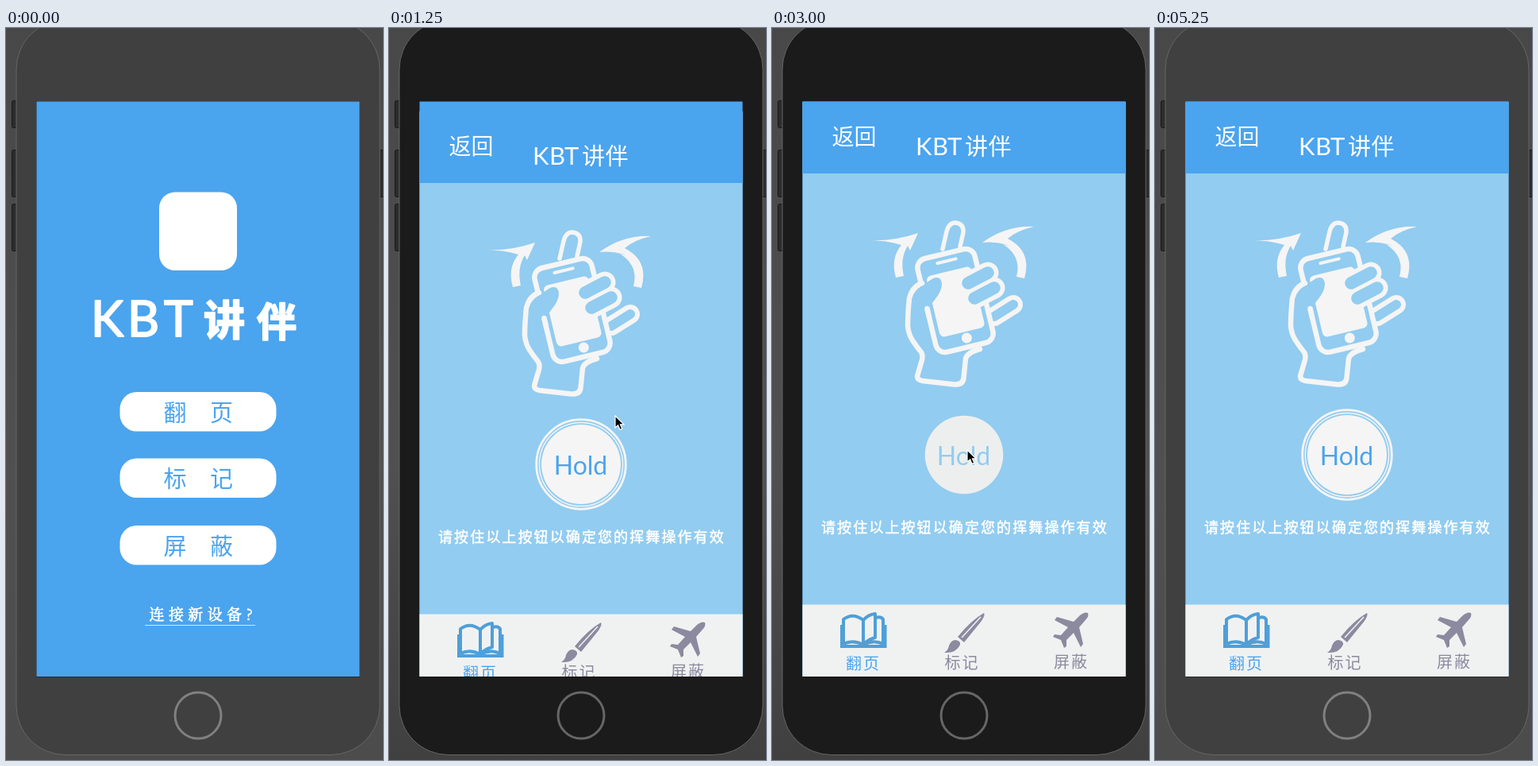
Recreate the animation shown at these times as an HTML page. Size 475 by 921 pixels, loop 5750 ms.

```html
<!DOCTYPE html>
<html lang="zh-CN">
<head>
<meta charset="utf-8">
<title>KBT讲伴</title>
<style>
html, body { margin: 0; width: 100%; height: 100%; overflow: hidden; background: #4d4d4d; }
svg { display: block; width: 100vw; height: 100vh; }
:root { --blue: #4ba4ee; --sky: #92ccf0; --grey: #8b8a9f; }
text { font-family: "Lato", "Noto Sans CJK SC", "Noto Sans CJK", sans-serif; stroke-linejoin: round; }
.serif { font-family: "Noto Serif CJK SC", "Noto Sans CJK SC", serif; font-weight: 500; }

.shade, .body, .ring, .page, .ink, .hold, .down, .cursor { animation: 5750ms step-end infinite; }
.shade { animation-name: shade; }
.body { animation-name: body; }
.ring { animation-name: ring; }
.page { animation-name: page; }
.ink { animation-name: ink; }
.hold { animation-name: hold; }
.down { animation-name: down; }
.cursor { animation-name: cursor; }

/* the window gains and loses focus */
@keyframes shade { 0%, 91.3% { stop-color: #4c4c4c; } 17.39% { stop-color: #404040; } }
@keyframes body { 0%, 91.3% { fill: #404040; } 17.39% { fill: #1b1b1b; } }
@keyframes ring { 0%, 91.3% { stroke: #808080; } 17.39% { stroke: #666; } }
@keyframes page {
  0% { transform: translateY(724px); }
  17.39% { transform: translateY(328.5px); }
  21.735% { transform: translateY(12px); }
  26.085%, 100% { transform: none; }
}
@keyframes ink { 0% { color: #fff; } 21.735%, 100% { color: #f5f5f5; } }
@keyframes hold { 0%, 73.91% { opacity: 1; } 52.17% { opacity: 0; } }
@keyframes down { 0%, 73.91% { opacity: 0; } 52.17% { opacity: 1; } }
@keyframes cursor {
  0% { transform: translate(500px, 490px); }
  4.345% { transform: translate(291px, 490px); }
  8.695% { transform: translate(285px, 488px); }
  30.43% { transform: translate(260px, 525px); }
  34.78% { transform: translate(246px, 531px); }
  82.605% { transform: translate(408px, 277px); }
  86.955%, 100% { transform: translate(500px, 153px); }
}
</style>
</head>
<body>
<svg viewBox="0 0 475 921">
  <defs>
    <linearGradient id="desk" x2="0" y2="1">
      <stop stop-color="#484848"/>
      <stop offset=".6" stop-color="#505050"/>
      <stop class="shade" offset="1"/>
    </linearGradient>
    <clipPath id="screen"><rect x="38" y="92" width="408" height="724"/></clipPath>
  </defs>

  <!-- phone -->
  <rect width="475" height="921" fill="url(#desk)"/>
  <g fill="#2c2c2c" stroke="#191919">
    <rect x="7.5" y="91.5" width="10" height="34" rx="2"/>
    <rect x="7.5" y="153.5" width="10" height="59" rx="2"/>
    <rect x="7.5" y="221.5" width="10" height="59" rx="2"/>
    <rect x="466" y="153.5" width="12" height="59" rx="2"/>
  </g>
  <rect class="body" x="13" y="-10" width="458" height="924.5" rx="62" stroke="#666"/>
  <circle class="ring" cx="242" cy="865" r="29" fill="none" stroke-width="3"/>
  <rect x="38" y="92" width="408" height="725" fill="#151515" opacity=".5"/>

  <g clip-path="url(#screen)">
    <!-- home -->
    <rect x="38.5" y="92.5" width="407" height="724" fill="var(--blue)"/>
    <g fill="#fff">
      <rect x="193" y="206.5" width="98" height="98.5" rx="20"/>
      <g stroke="#fff" stroke-width="2">
        <text x="107 153 199" y="388" font-size="62">KBT</text>
        <text x="249" y="387" font-size="52" font-weight="700">讲</text>
        <text x="316" y="388" font-size="50" font-weight="700">伴</text>
      </g>
      <rect x="143.5" y="458" width="197" height="49.5" rx="21"/>
      <rect x="143.5" y="541.5" width="197" height="49.5" rx="21"/>
      <rect x="143.5" y="626" width="197" height="49.5" rx="21"/>
      <text class="serif" x="180.5" y="744.5" font-size="19" letter-spacing="5.4" stroke="#fff" stroke-width=".7">连接新设备?</text>
      <rect x="175" y="751" width="139" height="1" opacity=".75"/>
    </g>
    <g fill="var(--blue)" font-size="29">
      <text x="198.5 257" y="495">翻页</text>
      <text x="198.5 257" y="578">标记</text>
      <text x="198.5 257" y="663">屏蔽</text>
    </g>

    <g class="page">
      <rect x="38.5" y="93" width="407" height="724" fill="var(--sky)"/>
      <rect x="38.5" y="92.5" width="407" height="90.5" fill="var(--blue)"/>
      <g fill="#fff">
        <text x="75.5" y="146.5" font-size="28" font-weight="300">返回</text>
        <text x="181 202 221" y="160" font-size="31">KBT</text>
        <text x="243 272.5" y="159.5" font-size="29" font-weight="300">讲伴</text>
        <text x="62" y="635" font-size="18" letter-spacing="2.1" font-weight="500" stroke="#fff" stroke-width=".5">请按住以上按钮以确定您的挥舞操作有效</text>
      </g>

      <!-- waving hand -->
      <g class="ink" fill="none" stroke="currentColor" stroke-width="6.5" stroke-linecap="round" stroke-linejoin="round">
        <g fill="currentColor" stroke="none">
          <path d="M119 267Q152 269 184 258L174 280L171 274Q161 290 166 312L156 314Q149 290 163 273Q145 267 119 267Z"/>
          <path d="M265 270Q295 248 330 250Q308 255 297 265Q328 281 318 315L308 313Q315 287 291 272L299 274Q283 268 265 270Z"/>
        </g>
        <path d="M215 278L220 256Q223 245 231 245Q242 246 241 257L237 275" stroke-width="5.5"/>
        <path d="M280 363L304 348" stroke-width="24"/>
        <path d="M280 363L304 348" stroke="var(--sky)" stroke-width="12"/>
        <path fill="var(--sky)" d="M188 321Q176 327 173 340Q171 360 171 375Q172 385 177 393Q183 402 188 408Q191 413 188 421L183 438Q183 443 190 444L230 448.5Q241 449 241.5 440L244 416Q246 408 262 404L220 350"/>
        <g transform="translate(231 343) rotate(-13.5)">
          <rect x="-37" y="-60.5" width="74" height="121" rx="12" fill="var(--sky)"/>
          <rect x="-29" y="-38" width="58" height="79" rx="6" fill="currentColor" stroke="none"/>
          <path d="M-11-51H13" stroke-width="4"/>
          <circle cx="3" cy="49" r="6.5" fill="currentColor" stroke="none"/>
        </g>
        <path fill="var(--sky)" stroke="none" d="M186 326L203 315Q213 311 214 322Q214 331 205 342L195 355L180 350Z"/>
        <path d="M189 321Q181 324 177 331M195.5 353L198 364"/>
        <path d="M247 321L272 308M255 340L280 327" stroke-width="27"/>
        <path d="M247 321L272 308M255 340L280 327" stroke="var(--sky)" stroke-width="15.5"/>
      </g>

      <!-- hold button -->
      <g class="hold">
        <g class="ink">
          <circle cx="242" cy="537" r="50" fill="currentColor"/>
          <g fill="none" stroke="currentColor">
            <circle cx="242" cy="537" r="52.6" stroke-width="1.5"/>
            <circle cx="242" cy="537" r="56.3" stroke-width="2.8"/>
          </g>
        </g>
        <text x="241.5" y="549.5" font-size="32" text-anchor="middle" fill="var(--blue)">Hold</text>
      </g>
      <g class="down">
        <circle cx="242" cy="537" r="49.3" fill="#edefee"/>
        <text x="241.5" y="549.5" font-size="32" text-anchor="middle" fill="var(--sky)">Hold</text>
      </g>

      <!-- tab bar -->
      <rect x="38.5" y="725.5" width="407" height="92" fill="#f0f2f2"/>
      <g fill="none" stroke="#4f9fd8" stroke-width="4" stroke-linejoin="round">
        <path d="M90 775V744Q102 735 115 745V776Q102 769 90 775M115 745Q121 738 130 737V767Q121 769 115 776M131 742Q137 740 140 744V775Q128 769 115 776"/>
        <path d="M88 751V778H142.5V751" stroke-linejoin="miter"/>
      </g>
      <g fill="var(--grey)">
        <path d="M267 736Q269 738 264 746L242 773L234 766Q251 745 267 736Z"/>
        <path d="M231 770Q238 771 237 776Q232 787 217 786Q222 783 223 777Q226 770 231 770Z"/>
        <path d="M263 741L239 767" stroke="#f0f2f2" stroke-width="1.5"/>
        <path d="M398 736Q394 734 388 739L380 747L359 741L356 745L373 754L364 764L356 763L354 766L364 770L368 780L371 778V770L380 761L389 779L392 775L387 754L394 746Q400 740 398 736Z"/>
      </g>
      <g font-size="20" letter-spacing="2" fill="var(--grey)">
        <text x="93" y="807" fill="var(--blue)" font-weight="500">翻页</text>
        <text x="217.5" y="805.5">标记</text>
        <text x="355" y="804.5">屏蔽</text>
      </g>
    </g>
  </g>

  <path class="cursor" d="M0 0V15L3.6 11.8L6 17.4L8.8 16.2L6.4 10.8H11Z" fill="#000" stroke="#fff" stroke-width="1.2"/>
</svg>
</body>
</html>
```
